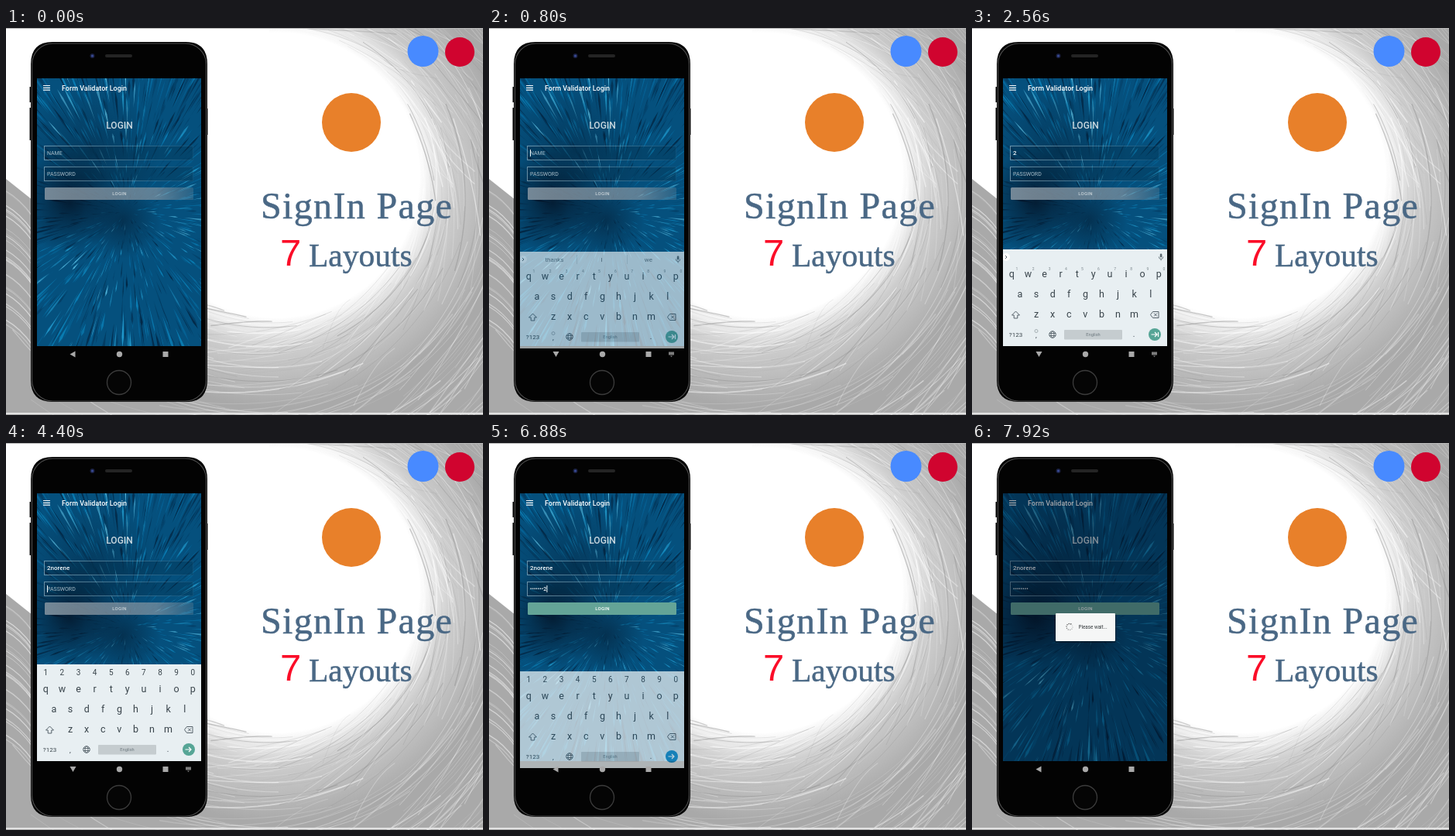
Recreate the animation shown at these times as an HTML page with a canvas. Size 616 by 500 pixels, loop 8 s.

```html
<!DOCTYPE html>
<html lang="en">
<head>
<meta charset="utf-8">
<title>Sign-in layouts</title>
<style>
  html, body { margin: 0; width: 100%; height: 100%; overflow: hidden; background: #fff; }
  canvas, svg { position: absolute; left: 0; top: 0; width: 616px; height: 500px; }
  text { font-family: Roboto, "Open Sans", sans-serif; white-space: pre; }
  .serif { font-family: "Liberation Serif", "Noto Serif", serif; fill: #4a6885; stroke: #4a6885; stroke-width: .5px; }
  .seven { font-family: "Liberation Sans", sans-serif; font-size: 49px; fill: #fb0d28; }
  .med { font-weight: 500; }
  .mid { text-anchor: middle; }
  .line { fill: none; stroke: #56626a; stroke-width: 1; }
</style>
</head>
<body>
<canvas id="art" width="616" height="500"></canvas>
<svg viewBox="0 0 616 500">
  <defs>
    <linearGradient id="edge" x1="0" x2="1">
      <stop offset="0" stop-color="#a9c4d2" stop-opacity=".62"/>
      <stop offset=".55" stop-color="#8fb4c6" stop-opacity=".4"/>
      <stop offset="1" stop-color="#8fb4c6" stop-opacity=".08"/>
    </linearGradient>
    <linearGradient id="ghost" x1="0" x2="1">
      <stop offset="0" stop-color="#8796a2" stop-opacity=".85"/>
      <stop offset=".75" stop-color="#8796a2" stop-opacity=".68"/>
      <stop offset="1" stop-color="#8796a2" stop-opacity=".25"/>
    </linearGradient>
    <clipPath id="glass"><rect x="40" y="65" width="212" height="367"/></clipPath>
  </defs>

  <!-- heading and badges -->
  <circle cx="538.500" cy="30" r="20" fill="#488aff"/>
  <circle cx="586" cy="31" r="19" fill="#d0042f"/>
  <circle cx="446" cy="122" r="38" fill="#e8802a"/>
  <text class="serif" x="329" y="246" font-size="48" letter-spacing="1.350">SignIn Page</text>
  <text class="seven" x="354" y="307">7</text>
  <text class="serif" x="391" y="308" font-size="41.500">Layouts</text>

  <!-- phone shell with a window for the screen -->
  <path fill="#111" d="M30.500 76h3v20h-3zM30.500 103h3v42h-3zM258 104h2.500v34h-2.500z"/>
  <path fill="#030303" fill-rule="evenodd" d="M60 18H232Q260 18 260 47V455Q260 483 232 483H60Q32 483 32 455V47Q32 18 60 18ZM40 65V411H252V65Z"/>
  <rect x="33.500" y="20" width="225" height="462" rx="27" fill="none" stroke="#4b4b4b" stroke-width="1.200"/>
  <rect x="128" y="34" width="35" height="4" rx="2" fill="#242424"/>
  <circle cx="111.500" cy="36" r="3" fill="#1b2140"/>
  <circle cx="111.500" cy="36" r="1.500" fill="#3a4c9a"/>
  <circle cx="146" cy="458" r="15.500" fill="#050505" stroke="#3c3c3c" stroke-width="1.300"/>

  <!-- login page -->
  <path d="M48 74.500h9M48 77.300h9M48 80.100h9" stroke="#fff" stroke-width="1.200"/>
  <text class="med" x="72" y="80.500" font-size="9" fill="#fff">Form Validator Login</text>
  <text class="med mid" x="146.500" y="130" font-size="12" fill="#cbd8df">LOGIN</text>
  <g fill="#021c30" fill-opacity=".22" stroke="url(#edge)">
    <rect x="49.500" y="152.500" width="192" height="18"/>
    <rect x="49.500" y="179.500" width="192" height="18"/>
  </g>
  <text id="name" x="53" y="164"></text>
  <text id="pass" x="53" y="191"></text>
  <rect id="caret" width="1" height="9" fill="#e8f1f5"/>
  <g id="button">
    <rect id="plate" x="50" y="206" width="192" height="16" rx="1.500"/>
    <text id="label" class="med mid" x="146.500" y="216.200" font-size="6" letter-spacing=".3">LOGIN</text>
  </g>

  <g clip-path="url(#glass)"><g id="board"></g></g>

  <!-- navigation bar -->
  <g fill="#a9a9a9">
    <path id="back"/>
    <circle cx="146.500" cy="421.500" r="3.700"/>
    <rect x="202.500" y="418" width="7" height="7"/>
    <path id="ime" d="M232 418.500h7v4h-7zM234 423.500h3l-1.500 1.700z" fill="#7d7d7d"/>
  </g>

  <!-- wait dialog -->
  <rect id="dim" x="40" y="65" width="212" height="346" fill="#000814"/>
  <g id="wait">
    <rect x="107" y="221" width="79" height="37" rx="2" fill="#000" opacity=".3"/>
    <rect x="108" y="220" width="77" height="36" rx="1" fill="#f5f6f6"/>
    <g id="spin"></g>
    <text x="137.500" y="240" font-size="6.300" fill="#353a3d">Please wait...</text>
  </g>
</svg>
<script>
const $ = id => document.getElementById(id);
const LOOP = 8000, STEP = 80;

function seeded(s) {
  return () => {
    s = (s + 0x6d2b79f5) | 0;
    let r = Math.imul(s ^ (s >>> 15), 1 | s);
    r = (r + Math.imul(r ^ (r >>> 7), 61 | r)) ^ r;
    return ((r ^ (r >>> 14)) >>> 0) / 4294967296;
  };
}

// ---- still artwork ----
const ctx = $('art').getContext('2d');

function drawSwirl() {
  const rnd = seeded(12), cx = 350, cy = 190;
  ctx.fillStyle = '#fff';
  ctx.fillRect(0, 0, 616, 500);
  ctx.save();
  ctx.beginPath();
  ctx.moveTo(340, 0);
  for (const [x, y] of [[616, 0], [616, 500], [0, 500], [0, 195], [34, 222], [262, 300], [340, 190]]) ctx.lineTo(x, y);
  ctx.clip();
  const g = ctx.createRadialGradient(cx, cy, 184, cx, cy, 300);
  g.addColorStop(0, 'rgba(168,168,168,0)');
  g.addColorStop(.35, 'rgba(172,172,172,.6)');
  g.addColorStop(1, '#a9a9a9');
  ctx.fillStyle = g;
  ctx.fillRect(0, 0, 616, 500);
  ctx.lineCap = 'round';
  for (let i = 0; i < 380; i++) {
    const r0 = 186 + 230 * Math.pow(rnd(), 1.7);
    const a0 = -1.75 + 3.7 * rnd(), len = .25 + .8 * rnd(), grow = 8 + 38 * rnd();
    const dark = r0 < 270 && rnd() < .36;
    ctx.strokeStyle = dark ? '#8f8f8f' : '#fff';
    ctx.globalAlpha = (dark ? .12 : .16) + .4 * rnd() * (r0 < 300 ? 1 : .6);
    ctx.lineWidth = .4 + 1.6 * rnd() * rnd();
    ctx.beginPath();
    for (let k = 0; k <= 16; k++) {
      const u = k / 16, a = a0 + len * u, r = r0 + grow * u * u;
      ctx.lineTo(cx + r * Math.cos(a), cy + r * Math.sin(a));
    }
    ctx.stroke();
  }
  // loose strands left of the phone
  for (let i = 0; i < 30; i++) {
    const y = 200 + 190 * rnd();
    ctx.globalAlpha = .15 + .4 * rnd();
    ctx.strokeStyle = '#fff';
    ctx.lineWidth = .5 + rnd();
    ctx.beginPath();
    ctx.moveTo(0, y);
    ctx.quadraticCurveTo(18, y + 10, 34, y + 32);
    ctx.stroke();
  }
  ctx.restore();
  ctx.fillStyle = '#b5b5b5';
  ctx.fillRect(0, 0, 616, 1);
  ctx.fillStyle = '#e4e4e4';
  ctx.fillRect(0, 497, 616, 2);
}

function drawBurst() {
  const rnd = seeded(77), cx = 156, cy = 237;
  ctx.save();
  ctx.beginPath();
  ctx.rect(40, 65, 212, 346);
  ctx.clip();
  ctx.fillStyle = '#05507d';
  ctx.fillRect(40, 65, 212, 346);
  const tones = ['#03233f', '#043a60', '#066a9f', '#0b82b9', '#239fd2', '#5cc3e8'];
  for (let i = 0; i < 1700; i++) {
    const a = 6.2832 * rnd(), r = 8 + 225 * Math.pow(rnd(), .75);
    const len = 5 + r * (.08 + .3 * rnd()), w = .25 + r * .011 * rnd();
    const glow = .4 + .16 * Math.sin(3 * a + 1) + .12 * Math.cos(a - .4);
    const pick = glow + (rnd() + rnd() - 1) * .62;
    ctx.fillStyle = tones[Math.max(0, Math.min(5, Math.floor(pick * 6)))];
    ctx.globalAlpha = .4 + .5 * rnd();
    const c = Math.cos(a), s = Math.sin(a), p = (d, n) => ctx.lineTo(cx + c * d - s * n, cy + s * d + c * n);
    ctx.beginPath();
    p(r, 0); p(r + len * .7, w); p(r + len, 0); p(r + len * .7, -w);
    ctx.fill();
  }
  ctx.globalAlpha = 1;
  const shade = (x, y, r, alpha) => {
    const g = ctx.createRadialGradient(x, y, 0, x, y, r);
    g.addColorStop(0, `rgba(3,18,36,${alpha})`);
    g.addColorStop(1, 'rgba(3,18,36,0)');
    ctx.fillStyle = g;
    ctx.fillRect(40, 65, 212, 346);
  };
  shade(82, 225, 66, .8);
  shade(150, 248, 50, .5);
  shade(110, 160, 90, .35);
  ctx.restore();
}

// ---- keyboard ----
const txt = (x, y, s, size = 12, fill = '#39444b', extra = '') =>
  `<text class="mid" x="${x}" y="${y}" font-size="${size}" fill="${fill}" ${extra}>${s}</text>`;
const keyRow = (s, x, y, size) => [...s].map((c, i) => txt(x + 21.1 * i, y, c, size)).join('');

function buildBoard() {
  const hints = [...'1234567890'].map((c, i) => txt(58 + 21.1 * i, 313, c, 5, '#7d888e')).join('');
  $('board').innerHTML = `
    <rect x="40" y="286" width="212" height="125" fill="#e8eff2"/>
    ${keyRow('qwertyuiop', 51.3, 322, 12.5)}
    ${keyRow('asdfghjkl', 62, 348, 12.5)}
    ${keyRow('zxcvbnm', 83, 374, 12.5)}
    <path class="line" d="M56.500 366l5 5h-2.700v4h-4.600v-4h-2.700z"/>
    <path class="line" d="M230.500 370.500l3-4h7.500v8h-7.500zM235 368.500l4 4M239 368.500l-4 4"/>
    ${txt(56.5, 399, '?123', 8)}${txt(83, 400, ',', 9)}${txt(209, 399, '.', 10)}
    <g class="line" style="stroke-width:.9"><circle cx="104" cy="396" r="4.300"/><ellipse cx="104" cy="396" rx="2" ry="4.300"/><path d="M100 394.500h8M100 397.500h8"/></g>
    <rect x="119" y="390" width="75" height="12.500" rx="1" fill="#c5cccf"/>
    ${txt(156.5, 398.3, 'English', 5.7, '#6f7a80')}
    <circle id="enter" cx="236" cy="396" r="8"/>
    <path d="M231.500 396h7.500M236 393l3 3l-3 3" fill="none" stroke="#fff" stroke-width="1.200"/>
    <g id="plain">${hints}
      <path d="M240.500 393v6" stroke="#fff" stroke-width="1.200"/>
      <circle cx="83" cy="391.500" r="2" fill="none" stroke="#8a959a" stroke-width=".7"/>
      <circle cx="44" cy="296" r="5" fill="#fff"/>
      <path class="line" d="M43 294l2 2l-2 2"/>
      <rect x="242.800" y="291.500" width="2.600" height="5" rx="1.300" fill="#5b676e"/>
      <path class="line" d="M241.300 295.500q0 3 2.800 3t2.800 -3M244.100 298.500v2" style="stroke-width:.8"/>
    </g>
    <g id="tips">
      ${txt(84.5, 299, 'thanks', 8, '#68747b')}${txt(145.500, 299, 'I', 8, '#68747b')}${txt(206, 299, 'we', 8, '#68747b')}
      <path d="M113.500 290v12M178.500 290v12" stroke="#cdd5d8"/>
    </g>
    <g id="digits">${keyRow('1234567890', 51.3, 300, 10)}</g>`;
}

function buildSpinner() {
  let s = '';
  for (let i = 0; i < 10; i++) {
    const a = i * Math.PI / 5;
    s += `<circle cx="${4 * Math.cos(a)}" cy="${4 * Math.sin(a)}" r=".75" fill="#222" opacity="${.15 + i * .085}"/>`;
  }
  $('spin').innerHTML = s;
}

// ---- timeline ----
const FOCUS_NAME = 560, FOCUS_PASS = 4000, CLOSE = 6800, WAIT = 7440;
const NAME = '2norene', PASS = 'hjklnmu2';
const nameKeys = [1920, 2720, 2880, 3040, 3200, 3360, 3520];
const passKeys = [4640, 4880, 5120, 5440, 5680, 6000, 6320, 6640];
const clamp = v => Math.max(0, Math.min(1, v));
const show = (id, on) => $(id).setAttribute('display', on ? 'inline' : 'none');
const set = (id, attrs) => { for (const k in attrs) $(id).setAttribute(k, attrs[k]); };

function field(id, value, hint, size) {
  $(id).textContent = value || hint;
  set(id, { 'font-size': value ? size : 7, 'font-weight': value ? 500 : 400, fill: value ? '#f2f7fa' : '#a9bfcb' });
}

function render(t) {
  const n = nameKeys.filter(k => k <= t).length, p = passKeys.filter(k => k <= t).length;
  const fresh = p && t < 7120;
  field('name', NAME.slice(0, n), 'NAME', 8);
  field('pass', p ? '•'.repeat(fresh ? p - 1 : p) + (fresh ? PASS[p - 1] : '') : '', 'PASSWORD', 7);

  const onPass = t >= FOCUS_PASS;
  const last = Math.max(onPass ? FOCUS_PASS : FOCUS_NAME, ...[...nameKeys, ...passKeys].filter(k => k <= t));
  const lit = t >= FOCUS_NAME && t < 7120 && (t - last) % 1000 < 500;
  const typed = onPass ? p : n;
  show('caret', lit);
  set('caret', {
    x: 53 + (typed ? $(onPass ? 'pass' : 'name').getComputedTextLength() + .3 : 0),
    y: onPass ? 184 : 157
  });

  const valid = p === PASS.length;
  show('button', t < FOCUS_NAME || t >= 720);
  set('plate', { fill: valid ? '#64a497' : 'url(#ghost)' });
  set('label', { fill: valid ? '#fff' : '#c8d2d8' });

  const rise = clamp((t - 640) / 240), fall = clamp((t - CLOSE) / 240);
  show('board', rise > 0 && fall < 1);
  set('board', {
    transform: `translate(0 ${27 * (1 - rise) ** 2 + 27 * fall})`,
    opacity: rise * (1 - fall ** 1.26)
  });
  show('plain', !onPass);
  show('digits', onPass);
  show('tips', n === 0);
  set('enter', { fill: fall > 0 ? '#1b90cc' : '#56a596' });

  const open = t >= FOCUS_NAME && t < CLOSE;
  show('ime', open);
  set('back', { d: open ? 'M82.500 418h8l-4 7z' : 'M89.500 417.500v8l-7-4z' });

  const w = clamp((t - WAIT) / 240);
  set('dim', { opacity: .36 * w });
  set('wait', { opacity: w, transform: `translate(146.500 238) scale(${1.1 - .1 * w}) translate(-146.500 -238)` });
  set('spin', { transform: `translate(126 237.500) rotate(${t * .36})` });
}

drawSwirl();
drawBurst();
buildBoard();
buildSpinner();
const start = performance.now();
function tick() {
  const t = (performance.now() - start) % LOOP;
  render(Math.floor(t / STEP) * STEP);
  requestAnimationFrame(tick);
}
tick();
</script>
</body>
</html>
```
